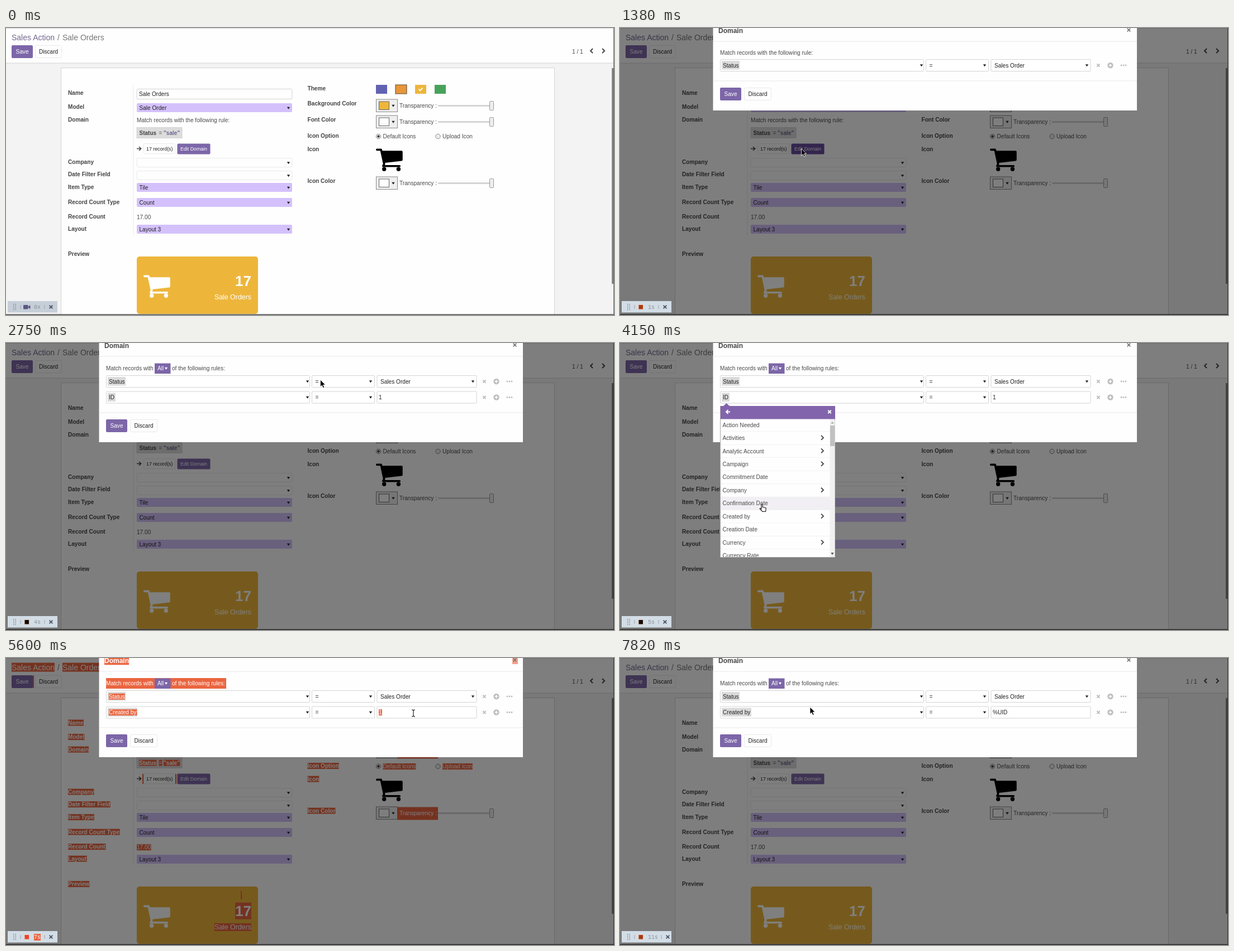
These frames come from a looping animation (1088x515 px, 8000 ms). An HTML page:

```html
<!DOCTYPE html>
<html lang="en">
<head>
<meta charset="utf-8">
<title>Domain editor</title>
<style>
html, body { margin: 0; width: 100%; height: 100%; overflow: hidden; }
svg {
  display: block; width: 1088px; height: 515px;
  font-family: "Liberation Sans", Arial, sans-serif;
  --page: #fefefe; --side: #f3f3f3; --line: #d4d4d4; --faint: #e9e9e9; --ink: #4a4a4a; --bold: #444;
  --field: #d4c1fb; --fieldInk: #222; --btn: #7c66a8; --edit: #7c66a8; --tile: #edb63b; --rec: #c6ced8;
}
svg.hover { --edit: #674b9b; }
svg.dim { --rec: #d2dde6; }
text { fill: var(--ink); white-space: pre; }
.b { font-weight: bold; fill: var(--bold); }
.f { fill: var(--fieldInk); }
.w { fill: #fff; }
.e { text-anchor: end; }
.m { text-anchor: middle; }
.cr { fill: #71668f; }
.so { fill: #777; }
.mono { font-family: "Liberation Mono", monospace; fill: #8a9099; }
.hl { fill: #ea6540; display: none; }
.sel .hl { display: inline; }
.sel .s { fill: #fff; }
</style>
</head>
<body>
<svg id="stage" viewBox="0 0 1088 515"></svg>
<script>
const stage = document.getElementById('stage');

// drawing helpers: text is placed by the middle of its capitals
const text = (x, y, str, cls = '', size = 10.1, id = '') =>
  `<text x="${x}" y="${y + size * .36}" font-size="${size}" class="${cls}" id="${id}">${str}</text>`;
const box = (x, y, w, h, fill, stroke = 'none', r = 0, extra = '') =>
  `<rect x="${x}" y="${y}" width="${w}" height="${h}" fill="${fill}" stroke="${stroke}" rx="${r}" ${extra}/>`;
const path = (d, stroke = 'none', width = 1, fill = 'none') =>
  `<path d="${d}" stroke="${stroke}" stroke-width="${width}" fill="${fill}"/>`;
const group = (id, body) => `<g id="${id}">${body}</g>`;
const tri = (x, y, fill = 'var(--fieldInk)') => path(`M${x - 2.7} ${y - 1.8}h5.4l-2.7 4z`, 'none', 0, fill);
const chevron = (x, y, dir, width = 2) => path(`M${x - 2 * dir} ${y - 4}l${4 * dir} 4l${-4 * dir} 4`, 'var(--bold)', width);
const cross = (x, y, r, color, width) =>
  path(`M${x - r} ${y - r}l${2 * r} ${2 * r}M${x - r} ${y + r}l${2 * r} ${-2 * r}`, color, width);
const mark = (x, y, w, h) => box(x, y, w, h, '', 'none', 0, 'class="hl"');
const button = (x, y, w, h, label, size = 10.1, fill = 'var(--btn)') =>
  box(x, y, w, h, fill, 'none', 2) + text(x + w / 2, y + h / 2, label, 'w m', size);
const plain = (x, y, w, h, label) =>
  box(x + .5, y + .5, w, h, 'none', 'var(--faint)', 2) + text(x + w / 2 + .5, y + h / 2, label, 'f m');
const cart = (x, y, color) => `<g transform="translate(${x} ${y}) scale(.0287)" fill="${color}">
  <path d="M1664 192V704Q1664 760 1607 768L563 890Q576 950 576 960 576 976 552 1024H1472Q1536 1024 1536 1088T1472 1152H448
    Q384 1152 384 1088 384 1060 445 951L268 128H64Q0 128 0 64T64 0H320Q380 0 399 128H1600Q1664 128 1664 192Z"/>
  <circle cx="512" cy="1280" r="128"/><circle cx="1408" cy="1280" r="128"/></g>`;
const select = (y, label) =>
  box(234, y - 8, 278, 16, label ? 'var(--field)' : 'none', label ? 'none' : 'var(--faint)', 2) +
  text(238.5, y, label, 'f') + tri(505.5, y + .5);
const picker = (y, color) =>
  box(662.5, y - 11.5, 38, 22.5, '#eee', '#888') + box(667.5, y - 7.5, 18, 14.5, color, '#666') +
  tri(693, y) + mark(701, y - 11, 72, 23) + text(704, y, 'Transparency :', 's') +
  box(773, y - 1.5, 96, 3, '#d4d4d4', 'none', 1) + box(865.5, y - 8, 7, 16, '#eee', '#999', 1);
const radio = (x, y, label, on) =>
  `<circle cx="${x}" cy="${y}" r="4.2" fill="#eee" stroke="#888"/>` +
  (on ? `<circle cx="${x}" cy="${y}" r="2.3" fill="#444"/>` : '') + text(x + 8, y, label, 's');

const labels = [['Name', 116], ['Model', 141.5], ['Domain', 164], ['Company', 240], ['Date Filter Field', 262.5],
  ['Item Type', 285.5], ['Record Count Type', 312], ['Record Count', 338.5], ['Layout', 360], ['Preview', 405.5]];
const rightLabels = [['Theme', 108.5], ['Background Color', 135], ['Font Color', 164], ['Icon Option', 193.5],
  ['Icon', 217], ['Icon Color', 274]];
const column = (x, list) => list.map(([s, y]) => text(x, y, s, 'b s')).join('');

const header = box(0, 0, 1088, 63, 'var(--page)') +
  text(10, 16.5, 'Sales Action', 'cr s', 14) + text(92, 16.5, '/', 'so', 14) + text(101, 16.5, 'Sale Orders', 'so s', 14) +
  button(10, 31, 38, 23, 'Save') + mark(48, 31, 2, 23) + plain(52, 31, 47, 22, 'Discard') +
  text(1013, 42, '1 / 1') + chevron(1048, 41, -1) + chevron(1069, 41, 1) +
  box(0, 62.5, 1088, 1, 'var(--line)') + box(0, 0, 1088, 1, 'var(--line)');

const form = box(98.5, 71.5, 883, 460, 'var(--page)', 'var(--line)') + box(227.5, 102, 1, 270, 'var(--faint)') +
  column(111, labels) + column(539.5, rightLabels) +
  box(234, 109.5, 278, 18, 'none', 'var(--line)', 2) + text(238, 118.5, 'Sale Orders', 'f') +
  select(143, 'Sale Order') + text(234, 165, 'Match records with the following rule:', 's') +
  box(234, 178.5, 81, 19, '#dcdcdc', 'var(--line)') + text(238.5, 188, 'Status', 'b s', 10) +
  text(273.5, 188, '=', 's') + text(282, 188, '"sale"', 'b cr s') +
  path('M234 216.5h7M238 213l3.7 3.5l-3.7 3.5', 'var(--bold)', 1.6) +
  mark(244, 208, 2, 18) + mark(303, 208, 2, 18) +
  box(246.5, 207.5, 56, 18, 'none', 'var(--faint)', 2) + text(251, 217, '17 record(s)', 'f', 8.8) +
  button(306.5, 207.5, 59, 19, 'Edit Domain', 8.8, 'var(--edit)') +
  select(241.5, '') + select(264.5, '') + select(286, 'Tile') + select(313, 'Count') +
  text(234, 339.5, '17.00', 's') + select(361, 'Layout 3') +
  ['#6262b2', '#de4a3a', '#edb63b', '#47a25a'].map((c, i) =>
    box(662 + 35 * i, 102, 20, 16, c, 'none', 0, `id="swatch${i}"`)).join('') +
  path('M738.5 109.5l2.5 2.8l4.5-5', '#fff', 1.8) +
  picker(139.5, 'var(--tile)') + picker(168.5, 'var(--page)') + picker(278.5, 'var(--page)') +
  radio(666.5, 194.5, 'Default Icons', true) + radio(773, 194.5, 'Upload Icon', false) +
  cart(662, 216.5, '#000') +
  box(234, 410, 217, 103, 'var(--tile)', 'none', 5) + cart(246, 443.5, '#fff') +
  mark(420, 418, 2, 15) + text(439, 453.5, '17', 'b w e s', 26) + text(439, 482.5, 'Sale Orders', 'w e s', 12.4);

const edges = box(1084, 72, 3, 387, '#858585') + box(1087, 0, 1, 515, '#666') + box(0, 513.5, 1088, 1.5, '#555');

// one rule line of the dialog
const pill = (y, str, w) => box(182, y - 8, w, 15.5, '#dadada') + text(184, y, str, 'f s');
const rule = (y, name, value) =>
  [[179.5, 364], [547.5, 112], [664, 178]].map(([x, w]) => box(x, y - 10.5, w, 21, '#fff', 'var(--line)', 1)).join('') +
  name + tri(539.5, y) + text(553.5, y, '=', 'f') + tri(652.5, y) + value +
  cross(856, y, 2.6, '#bbb', 1.8) + `<circle cx="877.5" cy="${y}" r="5.2" fill="#bcbcbc"/>` +
  path(`M874.5 ${y}h6M877.5 ${y - 3}v6`, '#fff', 1.5) +
  [897, 901, 905].map(x => `<circle cx="${x}" cy="${y}" r="1.4" fill="#bbb"/>`).join('');
const salesOrder = y => text(670, y, 'Sales Order', 'f') + tri(835.5, y);
const frame = h => box(166.5, -5, 758.5, h + 5, '#fefefe') + box(167, 23.5, 758, 1, 'var(--faint)') +
  text(176, 5, 'Domain', 'b s', 12) +
  `<g opacity=".6">${mark(906, 0, 10, 11)}</g>` + cross(910.5, 3.5, 2.8, '#777', 1.7) +
  box(167, h - 53.5, 758, 1, 'var(--faint)') + button(179, h - 41, 38, 23, 'Save') + plain(222, h - 41, 48, 22, 'Discard');

const one = frame(148) + text(179, 44, 'Match records with the following rule:') +
  rule(67, pill(67, 'Status', 32), salesOrder(67));
const two = frame(178) + mark(179, 36, 215, 19) + text(179, 45.5, 'Match records with', 's') +
  box(266, 36.5, 28.5, 18.5, 'var(--btn)') + text(271, 45.5, 'All', 'w') + tri(286.5, 45.5, '#fff') +
  text(297, 45.5, 'of the following rules:', 's') +
  rule(69, pill(69, 'Status', 32), salesOrder(69)) +
  rule(97.5, group('byId', pill(97.5, 'ID', 14)) + group('byUser', pill(97.5, 'Created by', 53)),
    text(667, 97.5, '1', 'f s', 10.1, 'value'));

const names = ['Action Needed', 'Activities', 'Analytic Account', 'Campaign', 'Commitment Date', 'Company',
  'Confirmation Date', 'Created by', 'Creation Date', 'Currency', 'Currency Rate'];
const nested = [1, 2, 3, 5, 7, 9];
const rowY = i => 147 + 23.45 * i;
const menu = path('M184 114l6.5-6l6.5 6z', 'none', 0, '#8264ac') +
  box(179.5, 113.5, 205, 271, '#fefefe', '#aaa') + box(180, 113, 205, 23.5, '#8264ac') +
  path('M197 123.5h-7M193.5 119.8l-3.7 3.7l3.7 3.7', '#fff', 1.8) + cross(375, 123.5, 2.8, '#fff', 2) +
  box(180, 0, 196, 23, '#f1eff3', 'none', 0, 'id="hoverRow"') +
  `<clipPath id="list"><rect x="180" y="136" width="205" height="248"/></clipPath><g clip-path="url(#list)">` +
  names.map((s, i) => text(183.5, rowY(i), s) + box(180, rowY(i) + 11.5, 196, .7, '#eee') +
    (nested.includes(i) ? chevron(362, rowY(i) - .5, 1, 1.8) : '')).join('') + '</g>' +
  box(375.5, 137, 9, 247, '#f1f1f1') + box(376, 148, 8, 37, '#c1c1c1') +
  path('M377.5 144.5l2.5-3l2.5 3z', 'none', 0, '#999') + tri(380, 378, '#555');

const recorder = box(3, 490, 89, 20.5, 'var(--rec)') +
  [0, 1, 2, 3].map(i => [13, 16.5].map(x => box(x, 495 + 3.2 * i, 1.5, 1.5, '#7b8490')).join('')).join('') +
  box(25.5, 497, 1, 7, '#9aa2ad') +
  group('camera', box(31, 497, 8.5, 7.5, '#5d5685', 'none', 1) + path('M39.5 500l4-2.8v7l-4-2.8z', 'none', 0, '#5d5685')) +
  box(33, 496.5, 8.5, 8.5, '#e8452b', '#e9cfc6', 0, 'id="lamp"') +
  mark(50, 495, 12, 12) + text(50, 500.5, '', 'mono s', 10, 'count') +
  group('recEnd', box(68.5, 497, 1, 7, '#9aa2ad') + cross(80.5, 500.5, 2.9, '#4c5568', 1.8));

const pointers =
  group('arrow', path('M0 0V12.5L2.9 9.9L5 14.6L7.2 13.6L5.1 9.1H9Z', '#fff', .8, '#000')) +
  group('hand', path('M-1 1.2q1-1.8 2.2 0V5.5l4.8 1q1.5.5 1.3 2L6.5 13.5H1L-3.8 8.5q.5-1.6 1.8-.6L-1 8.8Z', '#111', 1.1, '#fff')) +
  group('beam', path('M-3-6q3 0 3 1.5V4.5Q0 6-3 6M3-6q-3 0-3 1.5M3 6Q0 6 0 4.5', '#222', 1.2));

const shade = box(0, 0, 1088, 515, '#000', 'none', 0, 'opacity=".5"');
stage.innerHTML = box(0, 0, 1088, 515, 'var(--side)') + header + form + edges +
  group('dialog', shade + group('one', one) + group('two', two) + group('menu', menu)) +
  group('recorder', recorder) + group('pointer', pointers);

// selection bands behind the selectable text
for (const el of stage.querySelectorAll('.s')) {
  const b = el.getBBox();
  if (b.width) el.insertAdjacentHTML('beforebegin', mark(b.x, b.y, b.width, b.height));
}

const $ = id => document.getElementById(id);
const show = (id, on) => { $(id).style.display = on ? '' : 'none'; };
const latest = (keys, t) => keys.findLast(k => k[0] <= t);

const ticks = [0, 80, 240, 410, 570, 900, 1060, 1220, 1380, 1540, 1700, 1860, 2020, 2180, 2340, 2500, 2750, 3000, 3250,
  3500, 3910, 3990, 4150, 4310, 4470, 4630, 4790, 4950, 5110, 5270, 5600, 5760, 6090, 6420, 6750, 7080, 7240, 7570, 7820];
const moves = [[0, 290, 360, ''], [410, 300, 330, 'arrow'], [1060, 322, 225, 'arrow'], [1220, 324.5, 217, 'hand'],
  [1380, 324.5, 216.5, 'arrow'], [1540, 400, 190, 'arrow'], [2020, 876, 66, 'hand'], [2340, 876, 66, 'hand'],
  [2500, 740, 70, 'arrow'], [2750, 562.5, 66, 'arrow'], [3250, 215, 95, 'hand'], [3500, 215, 95, 'hand'],
  [4150, 254, 289, 'hand'], [4310, 250, 309, 'hand'], [4470, 250, 309, 'hand'], [4790, 374, 122, 'hand'],
  [4950, 374, 122, 'arrow'], [5270, 729, 99, 'beam'], [7240, 729, 99, 'beam'], [7570, 480, 92, 'arrow'],
  [7820, 340, 88, 'arrow'], [8000, 340, 88, 'arrow']];
const seconds = [[0, '0x'], [1060, '1s'], [1860, '2s'], [2340, '3s'], [2750, '4s'], [3500, '5s'], [4790, '6s'],
  [5270, '7s'], [6090, '8s'], [6750, '9s'], [7080, '10s'], [7570, '11s']];
const lamps = [[0, '#e8452b'], [1380, '#a83a12'], [1700, '#170a06'], [2020, '#e8452b'], [2500, '#170a06'],
  [3250, '#a83a12'], [3910, '#170a06'], [4470, '#e8452b'], [4950, '#170a06'], [5270, '#e8452b'], [6090, '#170a06'],
  [6750, '#e8452b'], [7240, '#170a06'], [7570, '#a83a12']];
const typed = [[0, '1'], [6090, '%'], [6420, '%U'], [6750, '%UI'], [7080, '%UID']];

function draw(now) {
  const t = ticks.findLast(k => k <= now % 8000);
  const dim = t >= 1380, both = t >= 2340;
  stage.classList.toggle('dim', dim);
  stage.classList.toggle('hover', t >= 1220 && t < 2340);
  stage.classList.toggle('sel', t === 5600);
  show('dialog', dim);
  show('one', !both);
  show('two', both);
  show('menu', t >= 3500 && t < 4950);
  show('byId', t < 4470);
  show('byUser', t >= 4470);
  $('value').textContent = latest(typed, t)[1];
  $('swatch1').setAttribute('fill', t < 80 ? '#e8963a' : '#de4a3a');
  $('swatch1').setAttribute('stroke', t < 80 ? '#5c4433' : 'none');

  show('camera', t < 1060);
  show('lamp', t >= 1060);
  $('lamp').setAttribute('fill', latest(lamps, t)[1]);
  const count = latest(seconds, t)[1];
  $('count').textContent = count;
  $('recEnd').setAttribute('transform', `translate(${count.length > 2 ? 5 : 0} 0)`);

  const from = latest(moves, t), to = moves[moves.indexOf(from) + 1];
  const k = (t - from[0]) / (to[0] - from[0]);
  const [x, y] = [1, 2].map(i => from[i] + (to[i] - from[i]) * k);
  $('pointer').setAttribute('transform', `translate(${x} ${y})`);
  for (const kind of ['arrow', 'hand', 'beam']) show(kind, from[3] === kind);

  const row = Math.round((y + 4 - 147) / 23.45);
  show('hoverRow', row >= 0 && row < names.length);
  $('hoverRow').setAttribute('y', rowY(row) - 11.5);
}

const start = performance.now();
function loop() {
  draw(performance.now() - start);
  requestAnimationFrame(loop);
}
loop();
</script>
</body>
</html>
```
